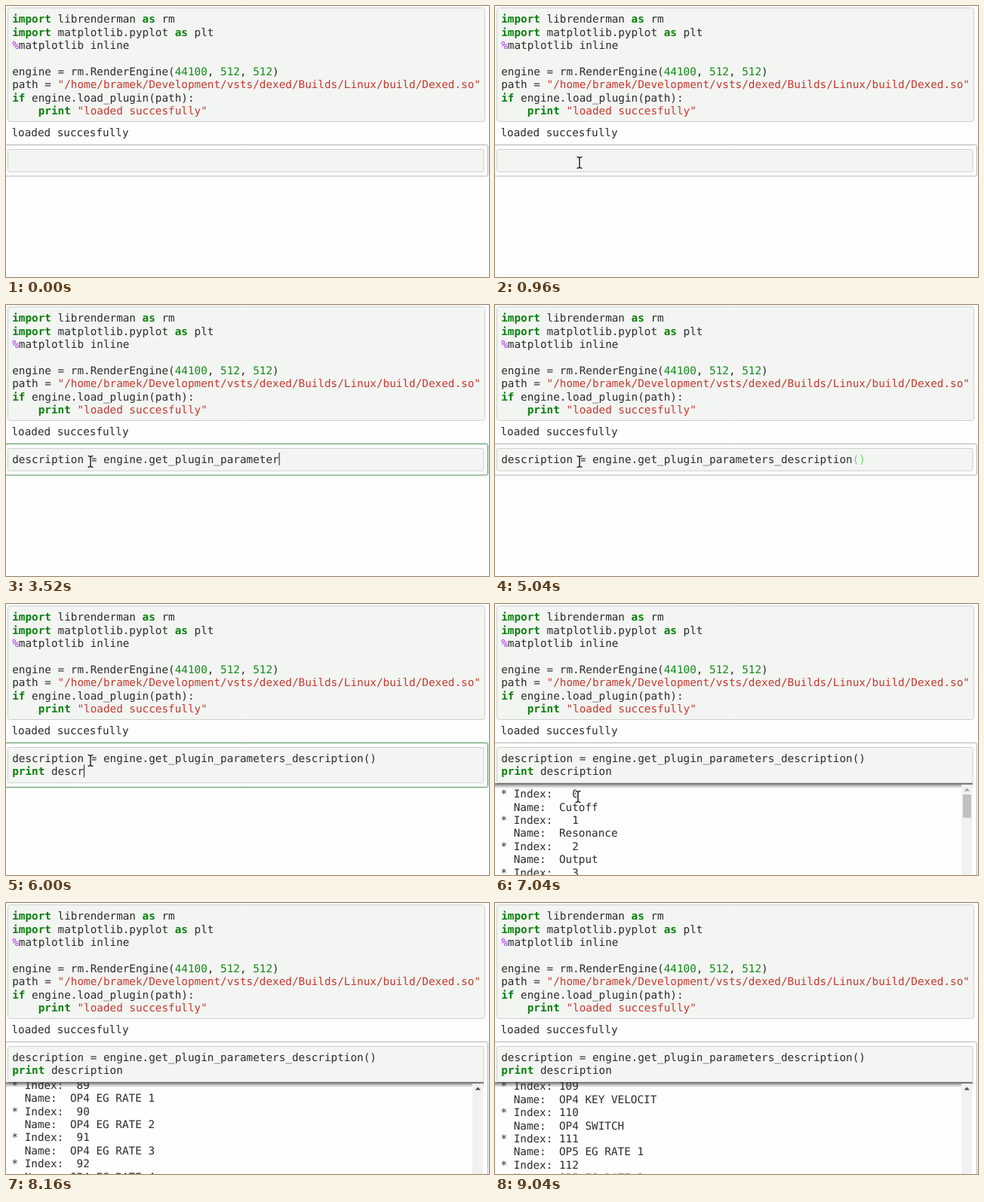
These frames come from a looping animation (640x360 px, 9120 ms). An HTML page with a canvas:

```html
<!DOCTYPE html>
<html lang="en">
<head>
<meta charset="utf-8">
<title>Notebook session</title>
<style>
  html, body { margin: 0; width: 100%; height: 100%; overflow: hidden; background: #fefefe; }
  canvas { display: block; }
</style>
</head>
<body>
<canvas id="stage" width="640" height="360"></canvas>
<script>
const ctx = document.getElementById('stage').getContext('2d');

const LOOP = 9120, STEP = 80;
const SIZE = 14.32, CHAR = SIZE * 0.602, LINE = 17.37;
const CODE_X = 8.2, OUT_X = 7.4;
const FONT = `${SIZE}px "DejaVu Sans Mono", monospace`;

const INK = '#2b2b2b', KEY = '#0b800f', STR = '#c5382f', NUM = '#138a1a', OP = '#a92ff0';
const BORDER = '#b3b3b8', ACTIVE = '#4f9152', MATCH = '#66d866';

// Each line is a list of [text, colour, bold] runs.
const key = s => [s, KEY, true];
const plain = s => [s, INK];
const str = s => [s, STR];
const num = s => [s, NUM];
const SETUP = [
  [key('import'), plain(' librenderman '), key('as'), plain(' rm')],
  [key('import'), plain(' matplotlib.pyplot '), key('as'), plain(' plt')],
  [['%', OP], plain('matplotlib inline')],
  [],
  [plain('engine = rm.RenderEngine('), num('44100'), plain(', '), num('512'), plain(', '), num('512'), plain(')')],
  [plain('path = '), str('"/home/bramek/Development/vsts/dexed/Builds/Linux/build/Dexed.so"')],
  [key('if'), plain(' engine.load_plugin(path):')],
  [plain('    '), key('print'), plain(' '), str('"loaded succesfully"')]
];

const CALL = 'description = engine.get_plugin_parameters_description()';
const PRINT = 'print description';

// Times in ms
const KEY_MS = 60, FOCUS = 1000, TYPE_1 = 1060, BLUR = 4720, NEWLINE = 5280, TYPE_2 = 5340, RUN = 6480;

const range4 = s => [1, 2, 3, 4].map(n => `${s} ${n}`);
const PARAMS = [
  'Cutoff', 'Resonance', 'Output', 'MASTER TUNE ADJ', 'ALGORITHM', 'FEEDBACK', 'OSC KEY SYNC',
  'LFO SPEED', 'LFO DELAY', 'LFO PM DEPTH', 'LFO AM DEPTH', 'LFO KEY SYNC', 'LFO WAVE',
  'TRANSPOSE', 'P MODE SENS.', ...range4('PITCH EG RATE'), ...range4('PITCH EG LEVEL')
];
const OPERATOR = [
  ...range4('EG RATE'), ...range4('EG LEVEL'), 'OUTPUT LEVEL', 'MODE', 'F COARSE', 'F FINE',
  'OSC DETUNE', 'BREAK POINT', 'L SCALE DEPTH', 'R SCALE DEPTH', 'L KEY SCALE', 'R KEY SCALE',
  'RATE SCALING', 'A MOD SENS.', 'KEY VELOCITY', 'SWITCH'
];
for (let n = 1; n <= 6; n++) PARAMS.push(...OPERATOR.map(p => `OP${n} ${p}`));

const SCROLL = [[7200, 0], [7760, 2787], [9040, 3795.5]];
const MOUSE_X = [[160, 652], [880, 112], [6640, 112], [6960, 110], [7040, 110], [7200, 624]];
const MOUSE_Y = [[160, 258], [880, 208], [6640, 208], [6960, 256], [7040, 256], [7200, 267]];

function track(points, t) {
  if (t <= points[0][0]) return points[0][1];
  for (let i = 1; i < points.length; i++) {
    const [t0, v0] = points[i - 1], [t1, v1] = points[i];
    if (t <= t1) return v0 + (v1 - v0) * (t - t0) / (t1 - t0);
  }
  return points[points.length - 1][1];
}

const typed = (text, start, t) =>
  text.slice(0, Math.max(0, Math.floor((t - start) / KEY_MS + 1e-6)));

// Draws on a fixed character grid and returns the x after the last cell.
function write(text, x, y, color = INK, bold = false) {
  ctx.font = (bold ? 'bold ' : '') + FONT;
  ctx.fillStyle = color;
  for (const c of text) {
    if (c !== ' ') ctx.fillText(c, x, y);
    x += CHAR;
  }
  return x;
}

function writeRuns(runs, y) {
  let x = CODE_X;
  for (const [text, color, bold] of runs) x = write(text, x, y, color, bold);
  return x;
}

function box(x, y, w, h, r, stroke, fill) {
  ctx.beginPath();
  ctx.roundRect(x, y, w, h, r);
  if (fill) { ctx.fillStyle = fill; ctx.fill(); }
  ctx.strokeStyle = stroke;
  ctx.lineWidth = 1;
  ctx.stroke();
}

function shape(points, fill) {
  ctx.beginPath();
  points.forEach(([x, y]) => ctx.lineTo(x, y));
  ctx.closePath();
  ctx.fillStyle = fill;
  ctx.fill();
}

function drawSetup() {
  box(2.5, 2.5, 632, 151, 3, '#cdd0cd', '#f3f5f2');
  SETUP.forEach((runs, i) => writeRuns(runs, 22.4 + i * LINE));
  write('loaded succesfully', OUT_X, 173.4);
}

function drawInput(t, ran, editing) {
  const second = t >= NEWLINE;
  const grow = second ? LINE : 0;
  box(-5.5, 184.5, 644, ran ? 400 : 41.5 + grow, 2, editing ? ACTIVE : BORDER);
  box(2.5, 190.5, 630.5, 29.8 + grow, 2, '#cdd0cd', '#f3f5f2');

  const y = 209.5;
  let caretY = y;
  let runs;
  const call = typed(CALL, TYPE_1, t);
  if (call.length >= CALL.length - 1) runs = [plain(CALL.slice(0, -2)), ['()', second ? INK : MATCH]];
  else if (call.endsWith('.')) runs = [plain(call.slice(0, -1)), ['.', '#a8527c']];
  else runs = [plain(call)];
  let caretX = writeRuns(runs, y);

  if (second) {
    const line = typed(PRINT, TYPE_2, t);
    caretY += LINE;
    caretX = writeRuns(line.length < 5 ? [plain(line)] : [key('print'), plain(line.slice(5))], caretY);
  }
  if (editing) {
    ctx.fillStyle = '#222';
    ctx.fillRect(caretX, caretY - 13.5, 1, 17);
  }
}

function drawOutput(scroll) {
  const top = 238;
  ctx.save();
  ctx.beginPath();
  ctx.rect(0, top, 633, 360 - top);
  ctx.clip();

  const shade = ctx.createLinearGradient(0, top, 0, top + 7);
  shade.addColorStop(0, 'rgba(0,0,0,.62)');
  shade.addColorStop(0.4, 'rgba(0,0,0,.3)');
  shade.addColorStop(1, 'rgba(0,0,0,0)');
  ctx.fillStyle = shade;
  ctx.fillRect(0, top, 633, 7);

  const pitch = LINE * 2;
  const first = Math.max(0, Math.floor(scroll / pitch) - 1);
  for (let i = first; i < first + 6 && i < PARAMS.length; i++) {
    const y = 257.3 + i * pitch - scroll;
    write('* Index: ' + String(i).padStart(3), OUT_X, y);
    write('  Name:  ' + PARAMS[i].slice(0, 15), OUT_X, y + LINE);
  }

  ctx.fillStyle = '#f1f1f1';
  ctx.fillRect(618, top + 2, 14.5, 360 - top);
  shape([[621.5, 248.5], [625.3, 244.5], [629, 248.5]], scroll > 0 ? '#505050' : '#a3a3a3');
  ctx.fillStyle = '#c1c1c1';
  ctx.fillRect(620, 253 + scroll * 0.0556, 11, 31);
  ctx.restore();
}

function beam(x, y) {
  const path = () => {
    ctx.beginPath();
    ctx.moveTo(x - 3.5, y - 7.5);
    ctx.quadraticCurveTo(x, y - 7.5, x, y - 5.5);
    ctx.quadraticCurveTo(x, y - 7.5, x + 3.5, y - 7.5);
    ctx.moveTo(x, y - 6);
    ctx.lineTo(x, y + 6);
    ctx.moveTo(x - 3.5, y + 7.5);
    ctx.quadraticCurveTo(x, y + 7.5, x, y + 5.5);
    ctx.quadraticCurveTo(x, y + 7.5, x + 3.5, y + 7.5);
  };
  for (const [color, width] of [['#fff', 3.6], ['#222', 1.5]]) {
    path();
    ctx.strokeStyle = color;
    ctx.lineWidth = width;
    ctx.stroke();
  }
}

function arrow(x, y) {
  const at = [[0, 0], [0, 14], [3.3, 11], [5.6, 16], [7.8, 15], [5.6, 10.2], [10, 10]];
  const points = at.map(([dx, dy]) => [x + dx, y + dy]);
  shape(points, '#222');
  ctx.strokeStyle = '#fff';
  ctx.lineWidth = 1;
  ctx.stroke();
}

function drawPointer(t, scroll) {
  if (t < 160) return;
  const x = track(MOUSE_X, t);
  const y = track(MOUSE_Y, t) + scroll * 0.0556;
  const overBlank = t < RUN && y > 220;
  (overBlank || x > 617 ? arrow : beam)(x, y);
}

function draw(t) {
  const ran = t >= RUN;
  const editing = t >= FOCUS && t < BLUR || t >= NEWLINE && !ran;
  const scroll = track(SCROLL, t);
  ctx.textRendering = 'geometricPrecision';
  ctx.textBaseline = 'alphabetic';
  ctx.fillStyle = '#fefefe';
  ctx.fillRect(0, 0, 640, 360);
  drawSetup();
  drawInput(t, ran, editing);
  if (ran) drawOutput(scroll);
  drawPointer(t, scroll);
}

const start = performance.now();
function tick() {
  const t = (performance.now() - start) % LOOP;
  draw(Math.floor(t / STEP) * STEP);
  requestAnimationFrame(tick);
}
tick();
</script>
</body>
</html>
```
